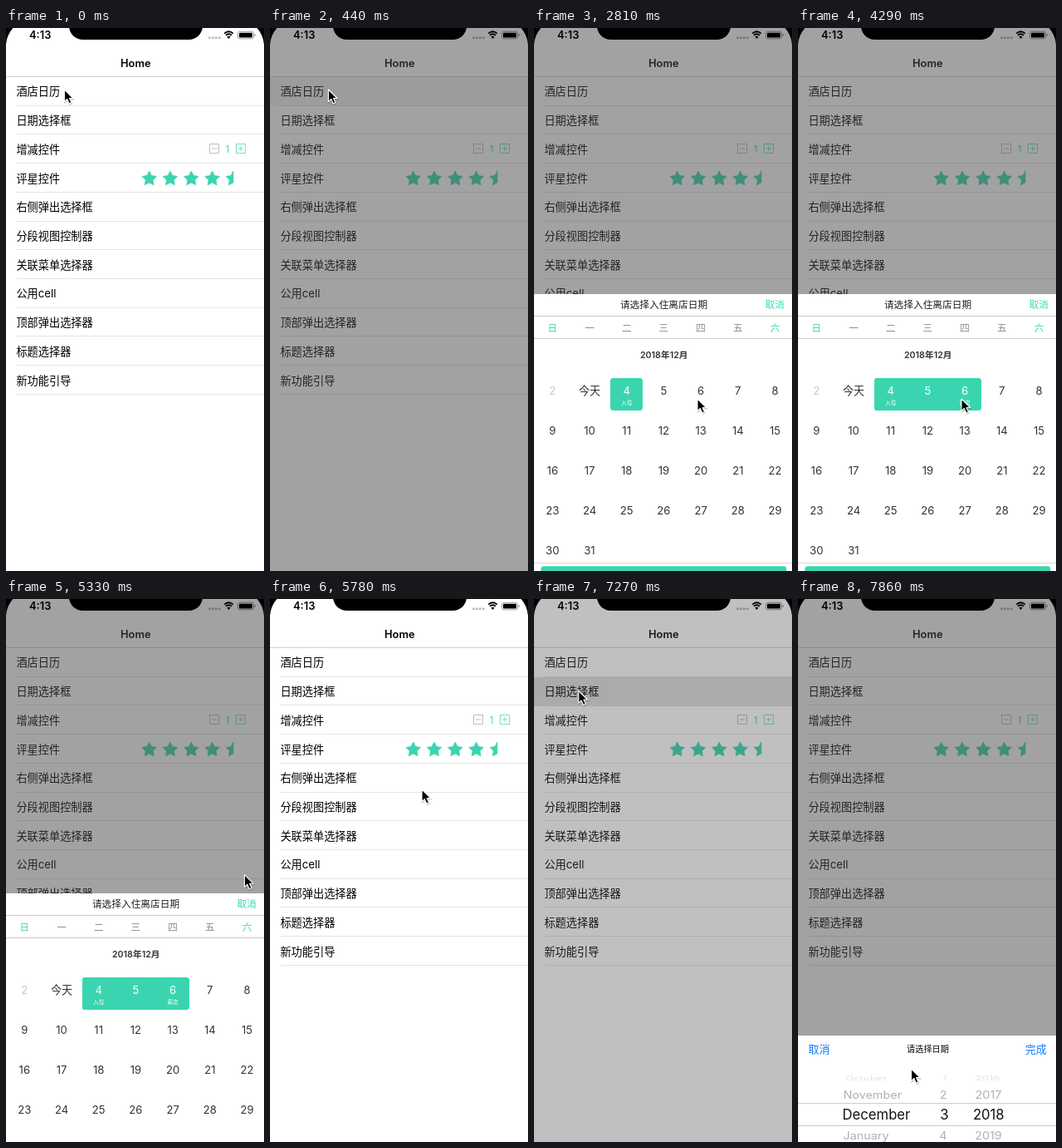
An HTML page that plays this animation: 311x653 px, repeating every 8000 ms.

```html
<!DOCTYPE html>
<html lang="zh-CN">
<head>
<meta charset="utf-8">
<title>Home</title>
<style>
html, body { margin: 0; width: 100%; height: 100%; overflow: hidden; background: #fff; }
svg { display: block; width: 311px; height: 653px; }
text { font-family: Inter, "Noto Sans CJK SC", "Noto Sans CJK", sans-serif; white-space: pre; }
</style>
</head>
<body>
<svg id="stage" viewBox="0 0 311 653"></svg>
<script>
const NS = 'http://www.w3.org/2000/svg';
const GREEN = '#3ad5b0', BLUE = '#0a7cff', INK = '#333';
const LOOP = 8000, STEP = 148.2;
const ROW = 34.72, LIST_TOP = 59;

function add(parent, tag, attrs) {
  const el = document.createElementNS(NS, tag);
  for (const k in attrs) el.setAttribute(k, attrs[k]);
  return parent.appendChild(el);
}
const group = (parent, attrs) => add(parent, 'g', attrs);
const box = (parent, x, y, width, height, fill, more) =>
  add(parent, 'rect', { x, y, width, height, fill, ...more });
const rule = (parent, x, y, stroke) =>
  add(parent, 'path', { d: `M${x} ${y}H311`, stroke, 'stroke-width': 1 });
const path = (parent, d, attrs) => add(parent, 'path', { d, ...attrs });

// y is the vertical middle of the glyphs
function label(parent, x, y, str, size, fill, anchor = 'middle', weight = 400) {
  const el = add(parent, 'text', {
    x, y: y + size * 0.365, fill, 'font-size': size, 'text-anchor': anchor, 'font-weight': weight
  });
  el.textContent = str;
  return el;
}

const svg = document.getElementById('stage');

// ---- home list ----
box(svg, 0, 0, 311, 653, '#fff');
const rowTop = i => LIST_TOP + i * ROW;
const pressed = [0, 1].map(i => box(svg, 0, Math.round(rowTop(i)), 311, 35, '#d7d7d7', { opacity: 0 }));
label(svg, 156.3, 42, 'Home', 12.8, '#000', 'middle', 600);
rule(svg, 0, 58.5, '#cfcfcf');
['酒店日历', '日期选择框', '增减控件', '评星控件', '右侧弹出选择框', '分段视图控制器',
 '关联菜单选择器', '公用cell', '顶部弹出选择器', '标题选择器', '新功能引导'].forEach((name, i) => {
  label(svg, 12.4, rowTop(i) + 17.6, name, 13.2, '#000', 'start');
  rule(svg, 12.5, Math.round(rowTop(i + 1)) - 0.5, '#e4e4e4');
});

// stepper
function stepButton(x, stroke, plus) {
  path(svg, `M${x} 139.5h11v11h-11zM${x + 2.5} 145h6` + (plus ? `M${x + 5.5} 142v6` : ''),
    { fill: 'none', stroke, 'stroke-width': 1 });
}
stepButton(245.5, '#bdbdbd', false);
stepButton(277.5, '#79dfc7', true);
label(svg, 267.2, 145.5, '1', 11.5, GREEN);

// rating stars
function star(cx, half) {
  const pts = [];
  for (let i = 0; i <= (half ? 5 : 9); i++) {
    const r = i % 2 ? 4.7 : 9.2, a = -Math.PI / 2 - i * Math.PI / 5;
    pts.push((cx + r * Math.cos(a)).toFixed(2) + ' ' + (181.3 + r * Math.sin(a)).toFixed(2));
  }
  path(svg, `M${pts.join('L')}Z`,
    { fill: GREEN, stroke: GREEN, 'stroke-width': 0.8, 'stroke-linejoin': 'round' });
}
for (let i = 0; i < 5; i++) star(172.7 + i * 25.3, i === 4);

const dim = box(svg, 0, 0, 311, 653, '#474747', { opacity: 0 });

// ---- status bar, never dimmed ----
label(svg, 41.2, 8.6, '4:13', 12.9, '#000', 'middle', 600);
for (let i = 0; i < 4; i++) add(svg, 'circle', { cx: 245.2 + i * 4, cy: 11.7, r: 1.5, opacity: 0.27 });
path(svg, 'M263.2 6.6Q268.5 2 273.8 6.6M265 8.8Q268.5 5.8 272 8.8',
  { fill: 'none', stroke: '#000', 'stroke-width': 1.8 });
path(svg, 'M266.4 10.6Q268.5 8.8 270.6 10.6L268.5 13Z');
box(svg, 279.5, 4.3, 19, 8.6, 'none', { rx: 2.4, stroke: '#000', 'stroke-width': 0.9, opacity: 0.42 });
box(svg, 281, 5.8, 16, 5.6, '#000', { rx: 1.2 });
path(svg, 'M299.6 7v3.2q1.4-.4 1.4-1.6t-1.4-1.6z', { opacity: 0.42 });

// ---- calendar sheet ----
const colX = c => 22.3 + c * 44.7;
const weekY = w => 436.5 + w * 47.9;
const cal = group(svg);
box(cal, 0, 320, 311, 345, '#fff');
label(cal, 156.5, 333.2, '请选择入住离店日期', 11.7, '#222');
label(cal, 290.3, 333.2, '取消', 11.5, GREEN);
rule(cal, 0, 346.5, '#c9c9c9');
[...'日一二三四五六'].forEach((d, c) =>
  label(cal, colX(c), 360.3, d, 11.6, c % 6 ? '#8a8a8a' : GREEN));
rule(cal, 0, 373.5, '#c9c9c9');
label(cal, 156.7, 393.2, '2018年12月', 10.7, INK, 'middle', 600);

const dayName = d => d === 3 ? '今天' : String(d);
for (let d = 2; d <= 31; d++) {
  label(cal, colX((d - 2) % 7), weekY(Math.floor((d - 2) / 7)), dayName(d), 13.1, d === 2 ? '#c8c8c8' : INK);
}

// selected stay in the first week, from column a to column b
function stay(a, b) {
  const g = group(cal);
  const left = Math.round(colX(a) - 19.4), right = Math.round(colX(b) + 19.6);
  box(g, left, 421, right - left, 39, GREEN, { rx: 3.5 });
  for (let c = a; c <= b; c++) label(g, colX(c), weekY(0), dayName(c + 2), 13.1, '#fff');
  label(g, colX(a), 450.6, '入住', 6.8, '#fff');
  if (b > a) label(g, colX(b), 450.6, '离店', 6.8, '#fff');
  return g;
}
const stays = [stay(1, 2), stay(2, 2), stay(2, 4)];

rule(cal, 0, 643.5, '#d6d6d6');
box(cal, 8.3, 647.3, 296, 30, GREEN, { rx: 3.5 });

// ---- date picker sheet ----
const picker = group(svg);
box(picker, 0, 525, 311, 140, '#fff');
label(picker, 12.5, 541.3, '取消', 13, BLUE, 'start');
label(picker, 156.5, 541.5, '请选择日期', 10.2, '#000');
label(picker, 299.8, 541.3, '完成', 13, BLUE, 'end');
rule(picker, 0, 606.5, '#cdcdcd');
rule(picker, 0, 633.5, '#cdcdcd');
[['October', '1', '2016', 576.5, 0.55, 13.2, '#e2e2e2', 57, 179.5, 228.5],
 ['November', '2', '2017', 596, 0.88, 14.4, '#b0b0b0', 54.5, 179.5, 229.5],
 ['December', '3', '2018', 620.3, 1, 16.7, '#111', 53.5, 181.5, 229.8],
 ['January', '4', '2019', 645, 0.88, 14.4, '#b0b0b0', 54.5, 179.5, 229.5]
].forEach(([month, day, year, y, tilt, size, fill, mx, dx, yx]) => {
  const g = group(picker, { transform: `translate(0 ${y}) scale(1 ${tilt})` });
  label(g, mx, 0, month, size, fill, 'start');
  label(g, dx, 0, day, size, fill, 'end');
  label(g, yx, 0, year, size, fill);
});

// ---- phone edge and pointer ----
path(svg, 'M76-2.600A16.600 16.600 0 0 0 92.600 14H220.400A16.600 16.600 0 0 0 237-2.600Z');
path(svg, 'M0 0H8.400A33 33 0 0 0 0 20ZM311 0H302.600A33 33 0 0 1 311 20Z');
const pointer = group(svg);
const arrow = 'M0 0V14.600L3.300 11.500 5.800 17 8.500 15.800 6.100 10.500H10.600Z';
path(pointer, arrow, { transform: 'translate(.6 1.2)', opacity: 0.2, stroke: '#000', 'stroke-width': 1.4 });
path(pointer, arrow, { stroke: '#fff', 'stroke-width': 1.1, 'stroke-linejoin': 'round' });

// ---- motion ----
const ramp = (t, a, b) => Math.min(1, Math.max(0, (t - a) / (b - a)));
const ease = p => p < 0.5 ? 2 * p * p : 1 - 2 * (1 - p) * (1 - p);
const eased = (t, a, b) => ease(ramp(t, a, b));

const trail = [
  [0, 70.4, 74], [460, 70.4, 74], [1180, 150, 492], [1330, 153.5, 490],
  [1630, 126, 338], [1780, 107, 410], [1930, 110, 449], [2223, 110, 449],
  [2810, 197, 446], [4300, 197, 446], [4890, 295, 346], [5040, 287.5, 331.7],
  [5340, 287.5, 331.7], [6225, 76, 124], [6520, 53.8, 110.5], [7260, 53.8, 110.5], [7850, 136.5, 565]
];
function pointerAt(t) {
  let i = trail.length - 1;
  while (trail[i][0] > t) i--;
  const a = trail[i], b = trail[i + 1] || a;
  const p = a === b ? 0 : eased(t, a[0], b[0]);
  return [a[1] + (b[1] - a[1]) * p, a[2] + (b[2] - a[2]) * p];
}

function slide(el, dy, height) {
  el.setAttribute('transform', `translate(0 ${Math.round(dy)})`);
  el.setAttribute('display', dy < height ? 'inline' : 'none');
}
const fade = (el, v) => el.setAttribute('opacity', v.toFixed(3));

function draw(t) {
  fade(pressed[0], t < 140 ? 0 : 1 - ramp(t, 250, 520));
  fade(pressed[1], t < 6810 ? 0 : 1 - ramp(t, 7200, 7500));
  fade(dim, 0.5 * (ramp(t, 200, 440) - ramp(t, 5450, 5700) + ramp(t, 7180, 7300)));

  slide(cal, 333 * (1 - eased(t, 470, 800) + eased(t, 5256, 5606)), 333);
  slide(picker, 128 * (1 - eased(t, 7300, 7680)), 128);

  fade(stays[0], t < 2215 ? 1 : 0);
  fade(stays[1], t < 2215 ? 0 : 1);
  fade(stays[2], ramp(t, 3180, 3690));

  const [x, y] = pointerAt(t);
  pointer.setAttribute('transform', `translate(${x.toFixed(2)} ${y.toFixed(2)})`);
}

function tick() {
  const t = performance.now() % LOOP;
  draw(Math.min(53, Math.floor((t + 5) / 148)) * STEP);
  requestAnimationFrame(tick);
}
tick();
</script>
</body>
</html>
```
